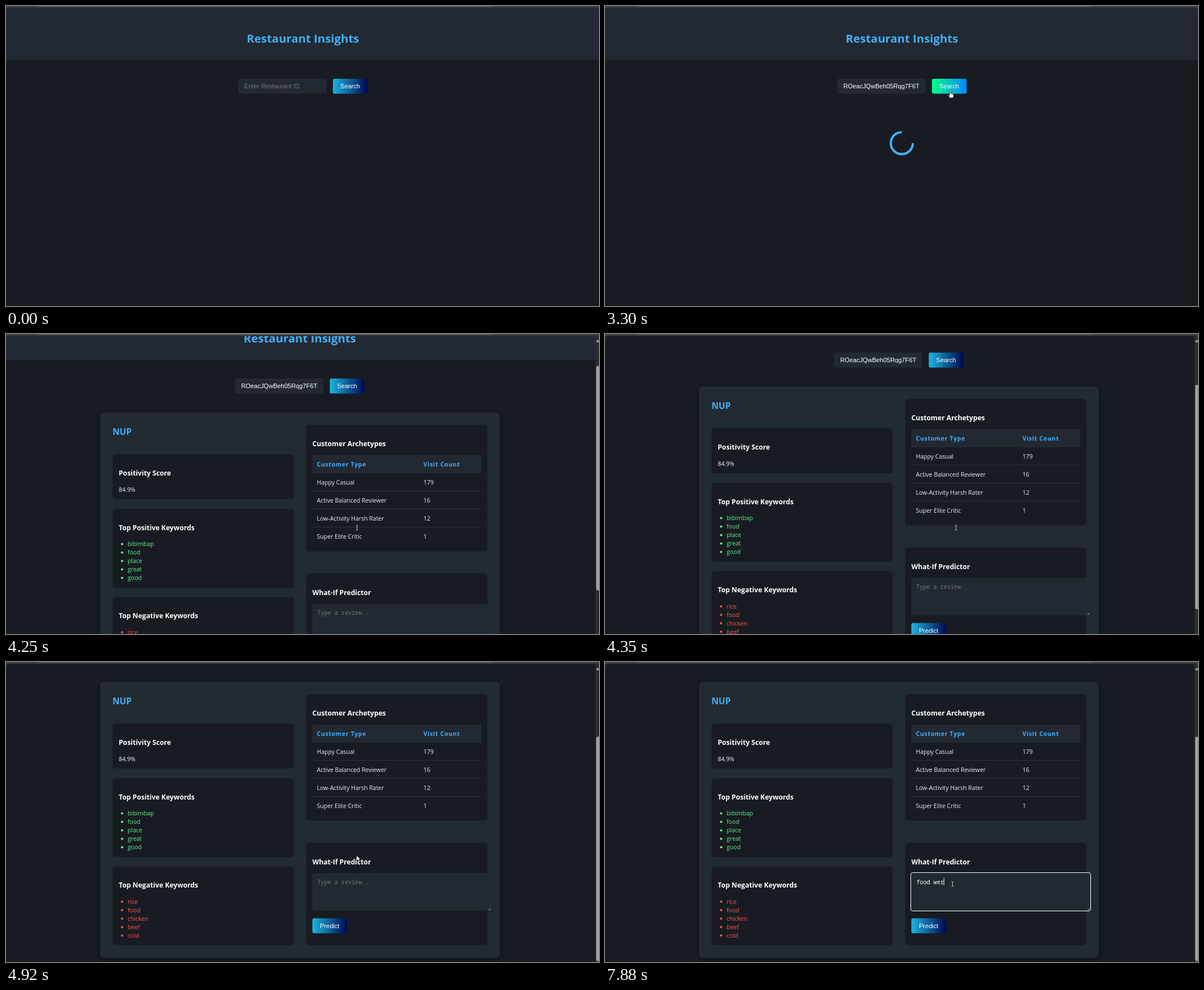
Animation of 1052x532 px, one loop 8000 ms. Source, as an HTML page:

```html
<!DOCTYPE html>
<html lang="en">
<head>
<meta charset="utf-8">
<title>Restaurant Insights</title>
<style>
  html, body { margin: 0; width: 100%; height: 100%; overflow: hidden; background: #181c22; }
  svg { display: block; }
  text { font: 10.5px "Open Sans", "Noto Sans", sans-serif; fill: #f2f6fa; }
  .h1 { font-size: 20.4px; font-weight: 700; fill: #41b0fc; }
  .h2 { font-size: 15.4px; font-weight: 700; fill: #41b0fc; }
  .h3 { font-size: 12.15px; font-weight: 700; fill: #fff; }
  .th { font-weight: 700; letter-spacing: .69px; fill: #41b0fc; }
  .td { fill: #e6f1fa; }
  .good { fill: #62ee8c; }
  .bad { fill: #fa564e; }
  .ui { font: 11.1px "Liberation Sans", Arial, sans-serif; fill: #fff; }
  .mono { font: 10.15px "Noto Sans Mono", "DejaVu Sans Mono", monospace; fill: #fff; white-space: pre; }
  .hint { fill: #757575; }
  .panel { fill: #222933; }
  .box { fill: #181c22; }
</style>
</head>
<body>
<svg id="stage" width="1052" height="532" viewBox="0 0 1052 532"></svg>
<script>
const LOOP = 8000, FRAME = 50;

// Markup helpers
const text = (x, y, cls, str, extra = '') => `<text x="${x}" y="${y}" class="${cls}" ${extra}>${str}</text>`;
const rect = (x, y, w, h, r, extra) => `<rect x="${x}" y="${y}" width="${w}" height="${h}" rx="${r}" ${extra}/>`;
const box = (x, y, h) => rect(x, y, 321.5, h, 5.5, 'class="box"');
const gradient = (id, from, to) =>
  `<linearGradient id="${id}"><stop stop-color="${from}"/><stop offset="1" stop-color="${to}"/></linearGradient>`;
const button = (x, y, label, id) =>
  rect(x, y, 61.5, 26.5, 3, `id="${id}" fill="url(#deep)"`) +
  text(x + 30.7, y + 17, 'ui', label, 'text-anchor="middle"');
const bullets = (words, y, cls) => words.map((word, i) =>
  `<circle cx="206" cy="${y + i * 15 - 3.5}" r="2.1" class="${cls}"/>` +
  text(215.8, y + i * 15, cls, word)).join('');
const tableRow = ([type, count], i) => {
  const y = 317.3 + i * 32;
  const line = i < 3 ? rect(543.5, y + 10.7, 299.5, 1, 0, 'fill="#2d333c"') : '';
  return text(551.5, y, 'td', type) + text(740.8, y, 'td', count) + line;
};

const customers = [['Happy Casual', 179], ['Active Balanced Reviewer', 16],
  ['Low-Activity Harsh Rater', 12], ['Super Elite Critic', 1]];
const query = 'ROeacJQwBeh05Rqg7F6Tdg';

const searchArea = `
  <g id="top">
    ${rect(-10, 3.5, 1080, 92.5, 0, 'class="panel"')}
    ${text(526.8, 65, 'h1', 'Restaurant Insights', 'text-anchor="middle"')}
    ${rect(412, 129, 156.5, 26.5, 3, 'class="panel"')}
    ${text(422.8, 146, 'ui hint', 'Enter Restaurant ID', 'id="inputHint"')}
    <g clip-path="url(#inputClip)">${text(422.7, 146, 'ui', query, 'id="query"')}</g>
    ${rect(423, 136, 1, 12, 0, 'id="inputCaret" fill="#fff"')}
    ${button(580, 129, 'Search', 'search')}
  </g>`;

const results = `
  <g id="results">
    ${rect(167, 189, 709, 489.5, 7, 'class="panel" filter="url(#shadow)"')}
    ${text(189, 229, 'h2', 'NUP')}
    ${box(189, 263, 80)}
    ${text(200, 301, 'h3', 'Positivity Score')}
    ${text(200, 329.5, '', '84.9%')}
    ${box(189, 360, 140)}
    ${text(200, 398, 'h3', 'Top Positive Keywords')}
    ${bullets(['bibimbap', 'food', 'place', 'great', 'good'], 426, 'good')}
    ${box(189, 516.5, 139.7)}
    ${text(200, 554, 'h3', 'Top Negative Keywords')}
    ${bullets(['rice', 'food', 'chicken', 'beef', 'cold'], 582.5, 'bad')}
    ${box(532.5, 211, 224.5)}
    ${text(543.5, 248.5, 'h3', 'Customer Archetypes')}
    ${rect(543.5, 265, 299.5, 32, 0, 'class="panel"')}
    ${text(551.5, 285.3, 'th', 'Customer Type')}
    ${text(740.5, 285.3, 'th', 'Visit Count')}
    ${customers.map(tableRow).join('')}
    ${box(532.5, 474.5, 182)}
    ${text(543.5, 512.5, 'h3', 'What-If Predictor')}
    ${rect(543.5, 528.5, 317, 66.5, 3, 'class="panel"')}
    ${rect(542.5, 527.5, 319, 68, 3.5, 'id="focus" fill="none" stroke="#fff"')}
    <path d="M856 594l3.5-3.5M858.3 594l1.2-1.2" stroke="#c8c8c8" stroke-width=".8"/>
    ${text(552.3, 547.5, 'mono hint', 'Type a review...', 'id="reviewHint"')}
    ${text(552.5, 547.5, 'mono', '', 'id="review"')}
    ${rect(552, 537, 1, 13, 0, 'id="reviewCaret" fill="#fff"')}
    ${button(543.5, 608.5, 'Predict', 'predict')}
  </g>`;

const stage = document.getElementById('stage');
stage.innerHTML = `
  <defs>
    ${gradient('deep', '#1cb5e0', '#000851')}
    ${gradient('bright', '#00ff87', '#0088ff')}
    <filter id="shadow" x="-10%" y="-10%" width="120%" height="120%">
      <feDropShadow dx="0" dy="3" stdDeviation="7" flood-opacity=".4"/>
    </filter>
    <clipPath id="pageClip">${rect(0, 3.5, 1052, 540, 5, '')}</clipPath>
    <clipPath id="inputClip">${rect(422, 129, 135.8, 27, 0, '')}</clipPath>
  </defs>
  ${rect(0, 0, 1052, 20, 0, 'fill="#3b3b3b"')}
  ${rect(57, 0, 807, 1, 0, 'fill="#686868"')}
  <g clip-path="url(#pageClip)">
    ${rect(0, 3, 1052, 530, 0, 'class="box"')}
    <g id="page">${searchArea}${results}</g>
    <circle id="spinner" cx="526.5" cy="243.2" r="19.5" fill="none" stroke="#41b0fc"
      stroke-width="4" pathLength="360" stroke-dasharray="270 90"/>
    <g id="scrollbar">
      ${rect(1045.5, 3, 7, 530, 0, 'fill="#2b2c2e"')}
      <path d="M1046.5 14.5L1049.7 9.5L1053 14.5Z" fill="#9f9f9f"/>
      ${rect(1047, 20.2, 8, 398, 3, 'id="thumb" fill="#9f9f9f"')}
    </g>
  </g>
  <circle id="click" r="8.2" fill="#ff0" fill-opacity=".47"/>
  <g id="pointer">
    <path id="arrow" d="M0 0V9.4L2.2 7.5L3.7 10.6L5.2 9.9L3.8 7H6.6Z"
      fill="#fff" stroke="#111" stroke-width=".6"/>
    <path id="beam" d="M-2-4.2H-.6L0-3.6L.6-4.2H2M0-3.6V3.6M-2 4.2H-.6L0 3.6L.6 4.2H2"
      fill="none" stroke="#d4d6d8" stroke-width=".9"/>
    <path id="hand" d="M-1 .2Q0-1.2 1 .2V4Q2.2 3.2 2.8 4.3Q4 3.7 4.5 4.8Q6 4.4 6 5.8V8Q6 9.8 4.8 11.4H-.6Q-1.4 9.6-3.4 7.2Q-3.6 5.8-2.2 6.2L-1 7.2Z"
      fill="#fff" stroke="#111" stroke-width=".7"/>
  </g>`;
const el = {};
stage.querySelectorAll('[id]').forEach(node => el[node.id] = node);

// Timelines
const moves = [ // start, end, steps, from, to
  [140, 310, 4, [964, 517], [701, 327]],
  [660, 980, 7, [701, 327], [492, 140]],
  [2530, 2780, 6, [492, 140], [612.3, 151.5]],
  [3640, 3790, 4, [612.3, 151.5], [622.8, 343.5]],
  [4920, 4920, 1, [622, 343], [622, 343]],
  [5060, 5310, 6, [622, 343], [616.5, 394]]
];
const clicks = [[1180, 1330, 490.5, 139.5], [2930, 3030, 611.7, 154.8], [5460, 5620, 615.5, 393.5]];
const scrolls = [[4100, 0], [4150, 8], [4250, 50], [4350, 96], [4450, 131], [4550, 151], [4650, 154]];
const keys = [6270, 6360, 6720, 7210, 7330, 7480, 7680, 7880];
const review = 'food wer';

const show = (node, on) => node.setAttribute('display', on ? 'inline' : 'none');
const within = (t, from, to) => t >= from && t < to;
const inside = ([x, y], l, t, r, b) => x >= l && x <= r && y >= t && y <= b;
const ease = p => p * p * (3 - 2 * p);

function pointerAt(t) {
  const move = moves.filter(m => m[0] <= t).pop();
  if (!move) return null;
  const [start, end, steps, from, to] = move;
  const p = steps < 2 ? 1 : Math.min(1, Math.floor((t - start) / (end - start) * (steps - 1) + 1e-6) / (steps - 1));
  // The first stretch enters at its own start; later ones have already left theirs.
  const q = start === 140 ? p : ease((p * (steps - 1) + 1) / steps);
  return from.map((v, i) => v + (to[i] - v) * q);
}

function scrollAt(time) {
  const t = Math.floor(time / FRAME) * FRAME;
  const i = scrolls.findIndex(s => s[0] > t);
  if (i === 0) return 0;
  if (i < 0) return scrolls[scrolls.length - 1][1];
  const [[t0, a], [t1, b]] = [scrolls[i - 1], scrolls[i]];
  return Math.round(a + (b - a) * (t - t0) / (t1 - t0));
}

function pointerKind(pos, t, loaded, hover) {
  if (hover) return 'hand';
  if (!loaded && inside(pos, 412, 129, 568, 155)) return 'beam';
  if (within(t, 3790, 4920)) return 'beam';
  return t > 5000 && inside(pos, 543, 374, 861, 441) ? 'beam' : 'arrow';
}

function draw(t) {
  const loaded = t >= 3350, scroll = scrollAt(t), shift = loaded ? -5.5 : 0;
  el.top.setAttribute('transform', `translate(${shift} 0)`);
  el.page.setAttribute('transform', `translate(0 ${-scroll})`);
  el.thumb.setAttribute('y', 20.2 + scroll * .73);
  show(el.results, loaded);
  show(el.scrollbar, loaded);

  const pasted = t >= 2230, atEnd = within(t, 2230, 2930);
  show(el.inputHint, !pasted);
  show(el.query, pasted);
  el.query.setAttribute('x', atEnd ? 557 : 422.7);
  el.query.setAttribute('text-anchor', atEnd ? 'end' : 'start');
  show(el.inputCaret, within(t, 1180, 1730) || within(t, 2230, 2730));
  el.inputCaret.setAttribute('x', pasted ? 557 : 423);

  show(el.spinner, within(t, 3200, 3350));
  const turn = Math.floor((t - 3300) / FRAME) * 18;
  el.spinner.setAttribute('transform', `rotate(${turn} 526.5 243.2)`);

  const typed = keys.filter(k => k <= t).length;
  show(el.focus, t >= 5460);
  show(el.reviewHint, !typed);
  el.review.textContent = review.slice(0, typed);
  show(el.reviewCaret, within(t, 5460, 5970) || typed > 0);
  el.reviewCaret.setAttribute('x', 552 + typed * 6.09);

  const pos = pointerAt(t);
  const hover = pos && scroll === 0 && inside(pos, 580 + shift, 129, 641.5 + shift, 155.5);
  el.search.setAttribute('fill', hover ? 'url(#bright)' : 'url(#deep)');
  show(el.pointer, pos);
  if (pos) {
    const kind = pointerKind(pos, t, loaded, hover);
    el.pointer.setAttribute('transform', `translate(${pos})`);
    ['arrow', 'beam', 'hand'].forEach(k => show(el[k], k === kind));
  }

  const click = clicks.find(([from, to]) => within(t, from, to));
  show(el.click, click);
  if (click) el.click.setAttribute('transform', `translate(${click[2]} ${click[3]})`);
}

const start = performance.now();
function tick() {
  draw((performance.now() - start) % LOOP);
  requestAnimationFrame(tick);
}
tick();
</script>
</body>
</html>
```
